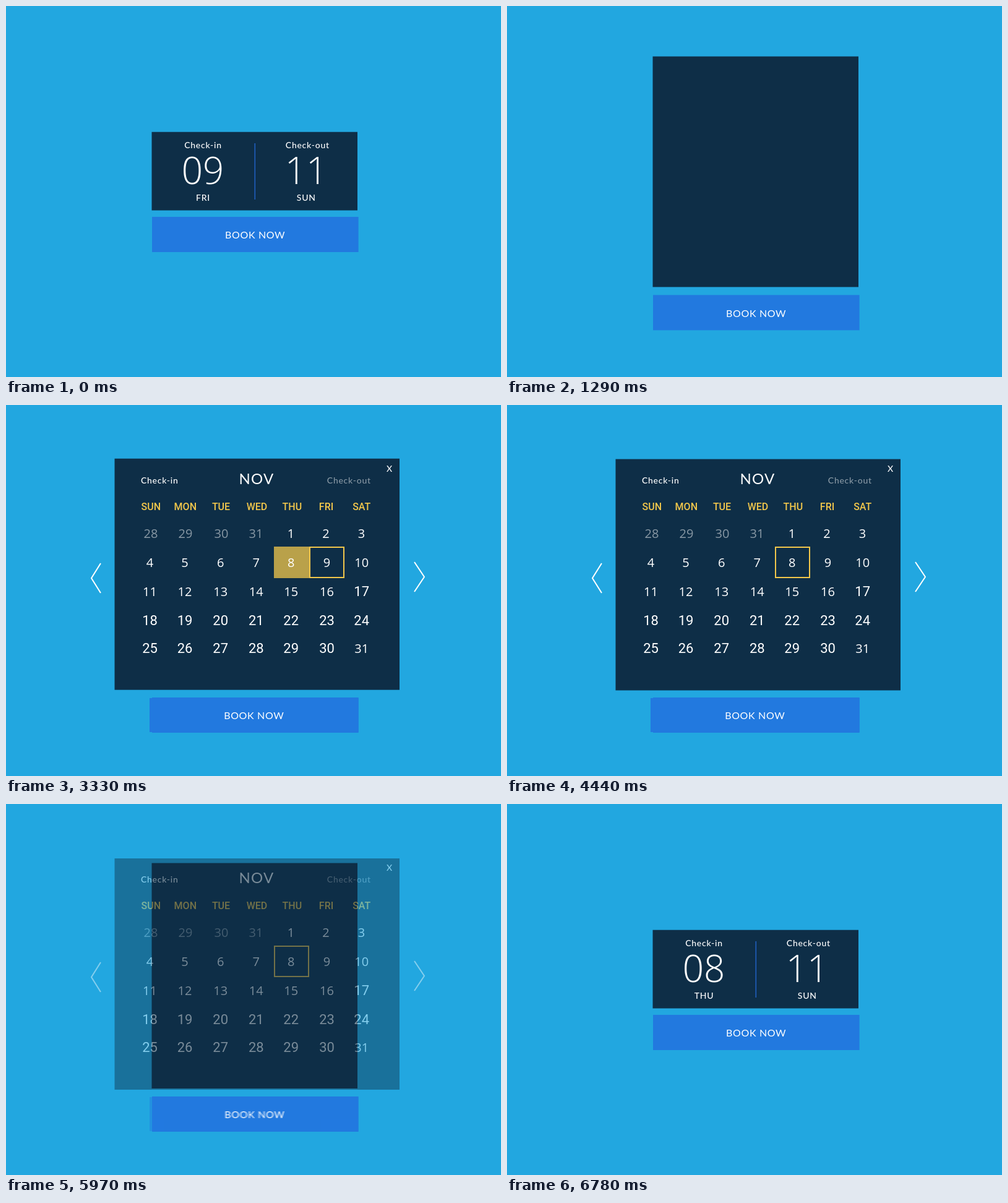
An HTML page for the animation above (8.07 s loop, 800 by 600 pixels).

```html
<!DOCTYPE html>
<html lang="en">
<head>
<meta charset="utf-8">
<title>Booking calendar</title>
<style>
  html, body { margin: 0; width: 100%; height: 100%; overflow: hidden; background: #22a7e0; }
  svg { display: block; width: 800px; height: 600px; }
  text { fill: #fff; text-anchor: middle; }
  .ui { font-family: Lato, sans-serif; font-weight: 500; font-size: 14px; letter-spacing: .75px; }
  .big { font: 300 60px "Open Sans", sans-serif; }
  .btn { font-weight: 400; font-size: 16px; letter-spacing: .65px; }
  .month { font-weight: 400; font-size: 24px; letter-spacing: 1.3px; }
  .head { font: 500 16px Roboto, sans-serif; fill: #f2c74b; }
  .day { font: 400 20px "Open Sans", sans-serif; }
  .wide { font: 400 22px Roboto, sans-serif; }
  .dim { opacity: .5; }
  .dark { fill: #0e2e47; }
  .blue { fill: #2279df; }
  .line { fill: none; stroke: #fff; stroke-width: 2; }
  .pick { fill: none; stroke: #f2c74b; stroke-width: 2; }
</style>
</head>
<body>
<svg viewBox="0 0 800 600">
  <rect width="800" height="600" fill="#22a7e0"/>
  <rect id="box" class="dark" x="235.5" width="332.5"/>
  <g id="summary">
    <path d="M402.3 222V313" stroke="#1f5fc0" stroke-width="1.6"/>
    <text class="ui" x="318.5" y="230">Check-in</text>
    <text class="big" id="inDay" x="318" y="288">09</text>
    <text class="ui" id="inName" x="318.5" y="315">FRI</text>
    <text class="ui" x="487.3" y="230">Check-out</text>
    <text class="big" x="485" y="288">11</text>
    <text class="ui" x="485.3" y="315">SUN</text>
  </g>
  <g id="button">
    <rect class="blue" x="236" width="333.6" height="57"/>
    <text class="ui btn" x="402.7" y="35.3">BOOK NOW</text>
  </g>
  <g id="calendar">
    <rect class="blue" x="232" y="474" width="337.6" height="55"/>
    <text class="ui btn" x="400.8" y="508.3">BOOK NOW</text>
    <rect id="sheet" class="dark" x="175.5" width="460.5" height="374"/>
    <rect id="fill" x="433" y="229" width="57" height="51" fill="#f2c74b"/>
    <rect id="pick8" class="pick" x="434" y="230" width="55" height="49"/>
    <rect id="pick9" class="pick" x="491" y="230" width="55" height="49"/>
    <text class="ui" x="248.2" y="127">Check-in</text>
    <text class="ui dim" x="554.3" y="127">Check-out</text>
    <text class="ui month" x="405" y="127.5">NOV</text>
    <text class="ui" x="620" y="107.5">X</text>
    <g id="days"></g>
    <path class="line" d="M153 256L138 280L153 304M660 254L676 278L660 302"/>
  </g>
  <circle id="ripple" fill="none" stroke="#fff"/>
</svg>
<script>
const $ = id => document.getElementById(id);
const LOOP = 8070, STEP = 30;

// calendar text
const heads = ['SUN', 'MON', 'TUE', 'WED', 'THU', 'FRI', 'SAT'];
const headX = [234.3, 289.8, 347.5, 405.5, 462.3, 517.5, 574.7];
const topX = [234, 290, 348, 404, 460.5, 517, 574.5];
const dayX = [232.5, 289, 346.7, 404.3, 460.7, 518.5, 574.7];
const rowY = [215, 262, 309, 356, 401.3];

function label(str, cls, x, y) {
  const el = document.createElementNS('http://www.w3.org/2000/svg', 'text');
  el.setAttribute('class', cls);
  el.setAttribute('x', x);
  el.setAttribute('y', y);
  el.textContent = str;
  $('days').append(el);
}

heads.forEach((h, i) => label(h, 'head', headX[i], 170));
for (let i = 0; i < 35; i++) {
  const col = i % 7, row = (i - col) / 7;
  const n = i < 4 ? 28 + i : i - 3;
  const wide = i > 3 && n > 16 && n < 31;
  const cls = wide ? 'wide' : i < 4 ? 'day dim' : 'day';
  label(n, cls, (row ? dayX : topX)[col], rowY[row]);
}

// motion
const ease = p => p < .5 ? 4 * p ** 3 : 1 - 4 * (1 - p) ** 3;
const linear = p => p;

// steps: [start, end, from, to, easing]
function track(steps, t) {
  let v = steps[0][2];
  for (const [a, b, from, to, fn = linear] of steps) {
    if (t < a) break;
    v = from + (to - from) * fn(Math.min(1, (t - a) / (b - a)));
  }
  return v;
}

const tracks = {
  top: [[900, 1490, 203.7, 59, ease], [5820, 6270, 79, 190.5, ease], [6270, 6690, 190.5, 203.7]],
  bottom: [[900, 1400, 330.5, 460, ease], [6071, 6600, 460, 330.5, ease]],
  button: [[900, 1400, 341, 473, ease], [6071, 6600, 473, 341, ease]],
  sheet: [[1710, 5130, 85.5, 88]]
};

const fades = {
  box: [[1500, 1680, 1, 0], [5820, 5910, 0, 1]],
  summary: [[900, 1080, 1, 0], [6600, 6780, 0, 1]],
  calendar: [[1440, 1710, 0, 1], [5820, 6090, 1, 0]],
  fill: [[3090, 3410, 0, 1], [3870, 4260, 1, 0]],
  pick8: [[3410, 3440, 0, 1]],
  pick9: [[3480, 3840, 1, 0]]
};

// taps: [start, end, x, y]
const taps = [
  [450, 900, 314.5, 269.5],
  [2520, 2910, 458.5, 255.5],
  [5310, 5820, 619, 103.5]
];

function drawTap(t) {
  const tap = taps.find(([a, b]) => t >= a && t < b);
  const el = $('ripple');
  el.style.opacity = 0;
  if (!tap) return;
  const [a, , x, y] = tap;
  const p = Math.min(1, (t - a + STEP) / 240);
  el.setAttribute('cx', x);
  el.setAttribute('cy', y);
  el.setAttribute('r', 48.8 * p);
  el.setAttribute('stroke-width', 3.4 * p);
  el.style.opacity = 1 - .95 * p;
}

function draw(now) {
  const t = Math.floor(now % LOOP / STEP) * STEP;
  const top = track(tracks.top, t);
  $('box').setAttribute('y', top);
  $('box').setAttribute('height', track(tracks.bottom, t) - top);
  $('button').setAttribute('transform', `translate(0 ${track(tracks.button, t)})`);
  $('sheet').setAttribute('y', track(tracks.sheet, t));
  for (const id in fades) $(id).style.opacity = track(fades[id], t);
  const changed = t > 3000;
  $('inDay').textContent = changed ? '08' : '09';
  $('inName').textContent = changed ? 'THU' : 'FRI';
  drawTap(t);
}

const start = performance.now();
function tick() {
  draw(performance.now() - start);
  requestAnimationFrame(tick);
}
tick();
</script>
</body>
</html>
```
